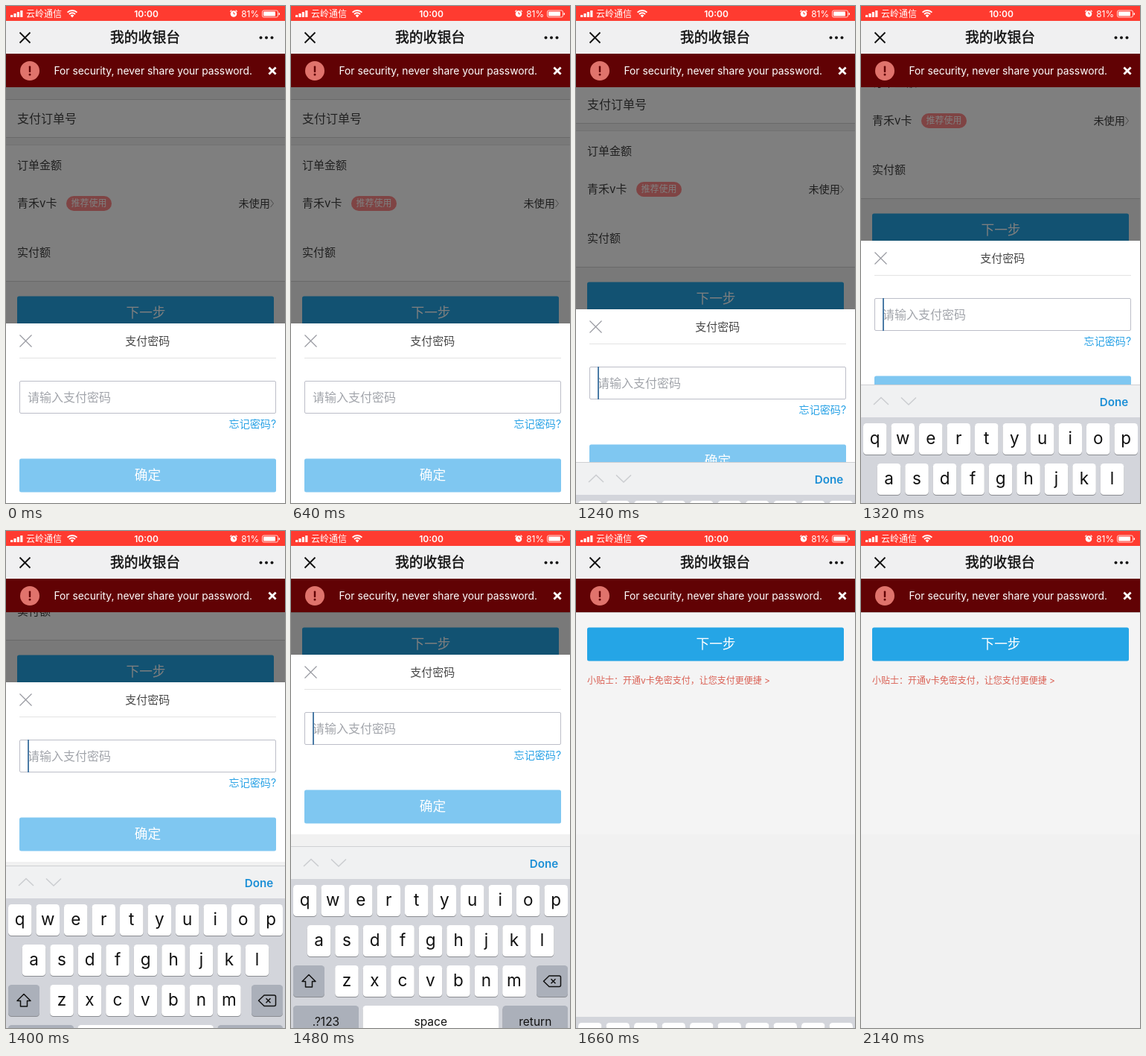
Recreate the animation shown at these times as an HTML page. Size 375x667 px, loop 2.16 s.

```html
<!DOCTYPE html>
<html lang="zh-CN">
<head>
<meta charset="utf-8">
<title>收银台</title>
<style>
html, body { margin: 0; width: 100%; height: 100%; overflow: hidden; background: #f1f1f1; }
svg { display: block; width: 375px; height: 667px; }
text { font-family: Inter, "Noto Sans CJK SC", "Noto Sans CJK", sans-serif; white-space: pre; }
.medium { stroke: #111; stroke-width: .45px; }
</style>
</head>
<body>
<svg id="stage" viewBox="0 0 375 667" xmlns="http://www.w3.org/2000/svg"></svg>
<script>
const LOOP = 2160, FOCUS = 1160, RISE = 1184.5, SCROLL = 1185, CUT = 1620;
const SPRING = 0.0151, LIFT = 260, BAR = 44;

const rect = (x, y, w, h, fill, extra = '') =>
  `<rect x="${x}" y="${y}" width="${w}" height="${h}" fill="${fill}" ${extra}/>`;
const path = (d, color, width, extra = '') =>
  `<path d="${d}" fill="none" stroke="${color}" stroke-width="${width}" ${extra}/>`;
const circle = (x, y, r, fill) => `<circle cx="${x}" cy="${y}" r="${r}" fill="${fill}"/>`;
// y is the vertical middle of the line
const text = (s, x, y, size, fill, anchor = 'start', weight = 400) =>
  `<text x="${x}" y="${y + size * 0.37}" font-size="${size}" fill="${fill}" text-anchor="${anchor}" font-weight="${weight}">${s}</text>`;
const cross = (x, y, r, color, width) =>
  path(`M${x - r} ${y - r}L${x + r} ${y + r}M${x + r} ${y - r}L${x - r} ${y + r}`, color, width);
const hline = (x, y, w, color) => rect(x, y, w, 1, color);

function pageArt() {
  const ink = '#404040', line = '#d4d4d4';
  let s = rect(0, 0, 375, 667, '#f4f4f4');
  for (const [top, bottom] of [[125, 176], [187, 238], [238, 289], [289, 369]])
    s += rect(0, top, 375, bottom - top, '#fff') + hline(0, bottom, 375, line);
  s += hline(0, 125, 375, line) + hline(0, 186, 375, '#e4e4e4');
  s += text('支付订单号', 15, 151, 16, ink) + text('订单金额', 15, 213, 15, ink);
  s += text('青禾v卡', 15, 264.5, 15, ink) + text('实付额', 15, 330, 15, ink);
  s += rect(81, 255, 61, 20, '#ff8a8a', 'rx="10"') + text('推荐使用', 111.5, 265, 12, '#fff', 'middle');
  s += text('未使用', 355, 264.5, 14.2, ink, 'end') + path('M355.5 260l4 5l-4 5', '#999', 1);
  s += rect(15, 389.5, 345, 45, '#25a5e6', 'rx="2.5"') + text('下一步', 188, 411.5, 17.7, '#fff', 'middle');
  s += text('小贴士：开通v卡免密支付，让您支付更便捷 &gt;', 15, 460.5, 12, '#da6054');
  return s;
}

function sheetArt() {
  return rect(0, 0, 375, 667, '#000', 'opacity=".5"')
    + rect(0, 426, 375, 241, '#fff')
    + cross(26.5, 449.5, 8, '#96989f', 1.1)
    + text('支付密码', 190.3, 449, 15, '#484848', 'middle')
    + hline(18, 472, 345, '#e3e3e3')
    + rect(18.5, 503.5, 344, 43, '#fff', 'stroke="#bcbec8" rx="1.5"')
    + text('请输入支付密码', 29, 525, 16, '#a2a5ab')
    + `<g id="caret">${rect(29, 503, 2, 44, '#4b7ba6')}</g>`
    + text('忘记密码?', 363.2, 561, 14.1, '#2ba3e6', 'end')
    + rect(18, 607.5, 345, 45, '#7fc7f1', 'rx="2.5"')
    + text('确定', 190.5, 629.5, 17.7, '#fff', 'middle');
}

function statusArt() {
  let s = rect(0, 0, 375, 20, '#ff3b30');
  for (let i = 0; i < 4; i++) s += rect(6 + i * 4.4, 12 - i * 2, 3.2, 3 + i * 2, '#fff', 'rx=".6"');
  s += text('云岭通信', 27, 10.3, 12, '#fff');
  s += path('M82.6 8.6a9 9 0 0 1 12.8 0M85 11a5.6 5.6 0 0 1 8 0', '#fff', 1.9);
  s += '<path d="M89 15.4l-2.4-2.6a3.4 3.4 0 0 1 4.8 0z" fill="#fff"/>';
  s += text('10:00', 188.5, 10.3, 12, '#fff', 'middle', 600);
  s += circle(306, 10.5, 4.3, '#fff') + path('M306 8v2.7h2', '#ff3b30', 1)
    + path('M301.3 7.6l2-2M310.7 7.6l-2-2', '#fff', 1.3);
  s += text('81%', 340, 10.5, 11.8, '#fff', 'end');
  s += rect(344.5, 6, 21, 9, 'none', 'rx="2" stroke="#fff" stroke-width=".8"')
    + rect(346, 7.5, 16, 6, '#fff', 'rx=".8"') + rect(366.6, 9, 1.4, 3.2, '#fff', 'rx=".7"');
  return s;
}

function headerArt() {
  return rect(0, 20, 375, 44, '#f0f0f1')
    + cross(25.5, 42.5, 7, '#111', 1.8)
    + `<g class="medium">${text('我的收银台', 187, 42, 18.8, '#111', 'middle')}</g>`
    + [342.5, 350, 357.5].map(x => circle(x, 42.5, 2, '#111')).join('')
    + rect(0, 64, 375, 45, '#610204')
    + circle(32, 87, 13, '#e0736c')
    + rect(30.8, 80.5, 2.4, 8.5, '#610204', 'rx=".8"') + circle(32, 92, 1.5, '#610204')
    + text('For security, never share your password.', 64.4, 87, 13.83, '#fff')
    + cross(358, 87, 4.6, '#fff', 2.8);
}

function key(x, y, w, label, size, fill = '#fff') {
  return rect(x, y + 1, w, 42, '#8b8d92', 'rx="4.5"') + rect(x, y, w, 42, fill, 'rx="4.5"')
    + (label ? text(label, x + w / 2, y + (size > 18 ? 20 : 21), size, '#111', 'middle') : '');
}

// Drawn from the top of the accessory bar
function keyboardArt() {
  const grey = '#abb0ba';
  let s = rect(0, BAR, 375, 220, '#d3d5db');
  [['qwertyuiop', 3, 52], ['asdfghjkl', 21.8, 106], ['zxcvbnm', 59.2, 160]].forEach(([row, x, y]) => {
    [...row].forEach((c, i) => s += key(x + i * 37.5, y, 31.5, c, 22.5));
  });
  s += key(3, 160, 42, '', 0, grey) + key(330, 160, 42, '', 0, grey);
  s += path('M24 172.5l9 9h-4.5v7.5h-9v-7.5H15z', '#111', 1.5, 'stroke-linejoin="round"');
  s += path('M347 174h13.5q2 0 2 2v10.5q0 2-2 2H347l-7.5-7.3z', '#111', 1.5, 'stroke-linejoin="round"')
    + cross(352.5, 181.2, 3, '#111', 1.5);
  s += key(3, 214, 88, '.?123', 15.5, grey) + key(96.5, 214, 182.5, 'space', 15.5)
    + key(284.5, 214, 87.5, 'return', 15.5, grey);
  const bar = rect(0, 0, 375, BAR, '#f0f1f2') + hline(0, 0, 375, '#cfd0d3')
    + path('M17 27l10-9.5l10 9.5M54 17.5l10 9.5l10-9.5', '#cbcdd0', 1.5)
    + text('Done', 359.3, 23, 15.2, '#1c8fd6', 'end', 600);
  return s + `<g id="bar">${bar}</g>`;
}

const stage = document.getElementById('stage');
stage.innerHTML = rect(0, 0, 375, 667, '#f1f1f1')
  + `<g id="page">${pageArt()}<g id="sheet">${sheetArt()}</g></g>`
  + headerArt() + statusArt()
  + `<g id="keyboard">${keyboardArt()}</g>`;
const [page, sheet, caret, keyboard, bar] =
  ['page', 'sheet', 'caret', 'keyboard', 'bar'].map(id => document.getElementById(id));

const show = (el, on) => el.setAttribute('display', on ? 'inline' : 'none');
const moveY = (el, y) => el.setAttribute('transform', `translate(0 ${Math.round(y)})`);
const clamp = u => Math.min(1, Math.max(0, u));
const easeInOut = u => u < 0.5 ? 2 * u * u : 1 - 2 * (1 - u) ** 2;
// Remaining distance of a critically damped spring
const rest = x => x <= 0 ? 1 : (1 + x) * Math.exp(-x);

function draw(t) {
  const closed = t >= CUT;
  const scroll = closed ? LIFT : LIFT * easeInOut(clamp((t - SCROLL) / 295));
  const up = closed
    ? BAR + 216 * rest(3.7 + SPRING * (t - CUT))
    : LIFT * (1 - rest(SPRING * (t - RISE)));
  moveY(page, -scroll);
  moveY(keyboard, 667 - up);
  show(sheet, !closed);
  show(bar, !closed);
  show(caret, t >= FOCUS);
  show(keyboard, t >= RISE);
}

const start = performance.now();
function tick() {
  draw((performance.now() - start) % LOOP);
  requestAnimationFrame(tick);
}
tick();
</script>
</body>
</html>
```
